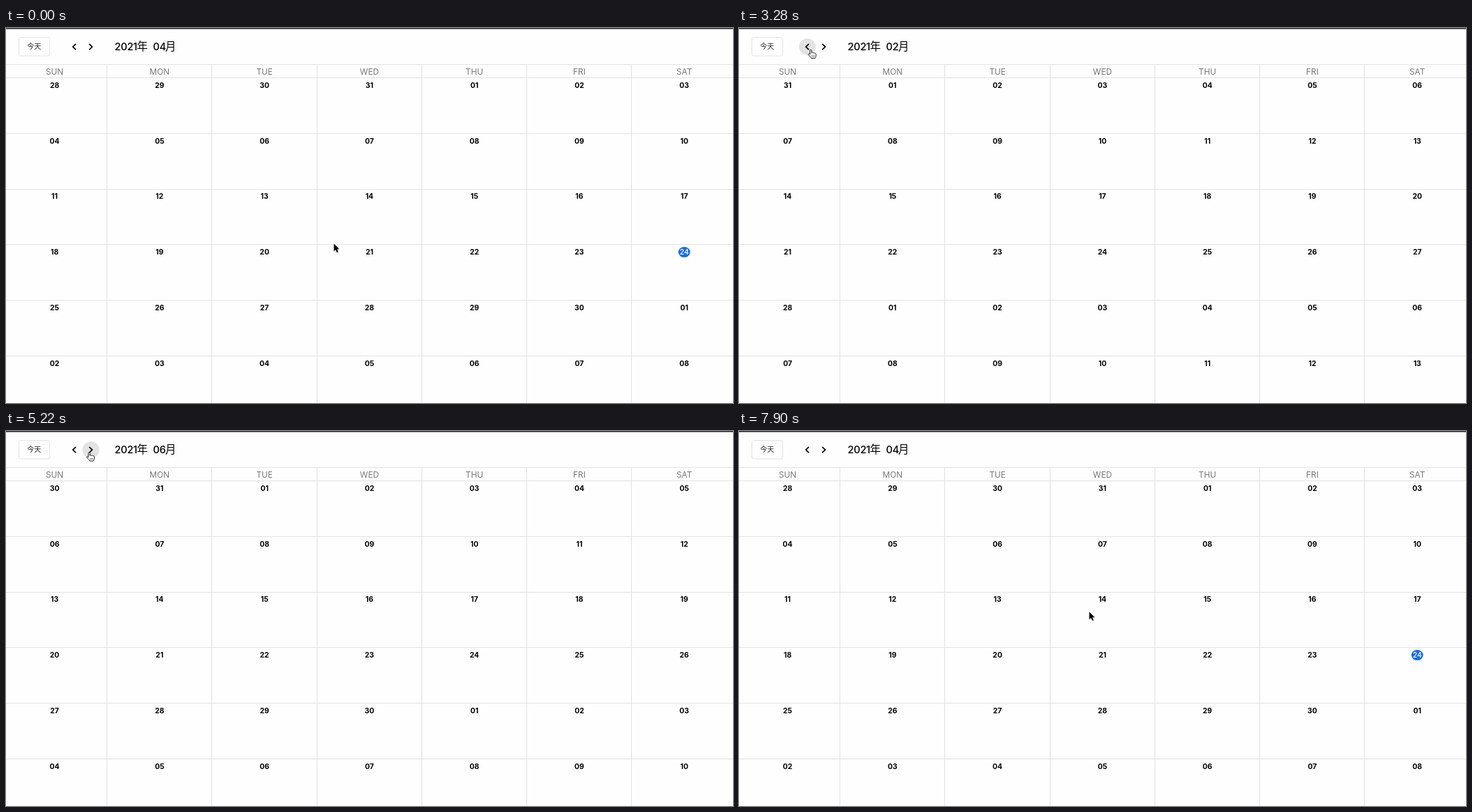
Write an HTML page that moves like this. It is 1041 px wide and 538 px high and loops after 8 s.

```html
<!DOCTYPE html>
<html lang="zh">
<head>
<meta charset="utf-8">
<title>Calendar</title>
<style>
  html, body { margin: 0; width: 100%; height: 100%; overflow: hidden; background: #fefefe; }
  svg { display: block; width: 100%; height: 100%; }
  text { font-family: Inter, Roboto, sans-serif; }
  .cjk { font-family: "Noto Sans CJK SC", "Noto Sans CJK", "Noto Sans CJK JP", sans-serif; }
  .head { font-size: 11.8px; fill: #777; text-anchor: middle; }
  .day { font-size: 10.4px; font-weight: 700; fill: #000; text-anchor: middle; }
  .day.today { font-weight: 500; fill: #fff; }
  .title { font-size: 14.6px; font-weight: 500; letter-spacing: -.3px; }
  .unit { font-size: 15.5px; font-weight: 500; }
  .chevron { fill: none; stroke: #000; stroke-width: 1.7; }
</style>
</head>
<body>
<svg id="stage" viewBox="0 0 1041 538">
  <rect width="1041" height="538" fill="#fefefe"/>
  <rect width="1041" height="1.5" fill="#262626"/>
  <g id="grid" fill="#e2e2e2"></g>

  <rect id="todayButton" x="18.5" y="13.5" width="44" height="26.5" rx="3" stroke="#e2e2e2"/>
  <text class="cjk" x="40.2" y="30.4" font-size="10" fill="#222" text-anchor="middle">今天</text>

  <circle id="hover" cy="27" r="12" fill="#e3e3e3"/>
  <path class="chevron" d="M100 22.8 L95.8 27 L100 31.2"/>
  <path class="chevron" d="M119.2 22.8 L123.4 27 L119.2 31.2"/>

  <text class="title" x="155.6" y="32.3">2021</text>
  <text class="unit cjk" x="187.4" y="32.4">年</text>
  <text class="title" id="month" x="210.6" y="32.3"></text>
  <text class="unit cjk" x="228" y="32.4">月</text>

  <ellipse id="mark" cx="971.2" cy="321.6" rx="8.5" ry="7.5" fill="#1a6fe0"/>
  <g id="days"></g>

  <g id="arrow">
    <path d="M.6 1.4 V12 L3 10 L4.8 14 L7 13 L5.3 9.2 H8.6 Z" fill="#000" opacity=".18"/>
    <path d="M0 0 V10.8 L2.5 8.6 L4.3 12.6 L6.3 11.7 L4.6 7.8 H7.8 Z"
          fill="#000" stroke="#fff" stroke-width=".9" paint-order="stroke"/>
  </g>
  <g id="hand">
    <path d="M3.2 7.6 V1.8 C3.2 .2 5.4 .2 5.4 1.8 V5.2 C6 4.4 7.4 4.6 7.6 5.4
             C8.4 4.8 9.6 5 9.8 5.9 C10.8 5.5 11.8 6 11.8 7.2 V9.2
             C11.8 11 10.6 11.4 10.4 13 H5 C4.6 11.4 2.6 10 1 8 C.2 6.9 1.4 6 2.2 6.7 Z"
          fill="#fff" stroke="#111" stroke-width=".95" stroke-linejoin="round"/>
    <path d="M6 8.6 V11 M7.7 8.6 V11 M9.4 8.6 V11" stroke="#111" stroke-width=".6"/>
  </g>
</svg>
<script>
const LOOP = 8000;
const COL = 150.27, ROW = 79.75;
const $ = id => document.getElementById(id);
const pad = n => String(n).padStart(2, "0");

// [time, month shown]
const months = [[0, 4], [1940, 3], [2680, 2], [4030, 3], [4320, 4], [4770, 5], [5220, 6], [5970, 4]];

// [time, hovered control]
const hovers = [[0, ""], [3280, "prev"], [3580, "next"], [5520, "prev"], [5670, "today"], [6710, ""]];

// [time, x, y, cursor]
const moves = [
  [0, 469.5, 309.5, "arrow"], [300, 440, 288, "arrow"], [450, 345, 218, "arrow"],
  [600, 235, 136, "arrow"], [750, 150, 72, "arrow"], [900, 107, 39, "arrow"], [1050, 95.5, 30, "arrow"],
  [1790, 97.5, 30.5, "hand"], [2080, 98.5, 30.5, "hand"],
  [3430, 105, 30.5, "hand"], [3580, 112, 30, "hand"], [3730, 114.8, 30, "hand"],
  [5370, 108, 30, "hand"], [5520, 86, 29, "hand"], [5670, 52, 27, "hand"], [5820, 40, 26, "hand"],
  [6710, 367, 140, "arrow"], [6860, 560, 236, "arrow"], [7010, 690, 310, "arrow"],
  [7160, 743, 340, "arrow"], [7460, 574, 301, "arrow"], [7760, 540, 281, "arrow"], [7900, 501.5, 259.5, "arrow"]
];

const latest = (list, t) => list.filter(item => item[0] <= t).pop();

function add(parent, tag, attrs, text = "") {
  const el = document.createElementNS("http://www.w3.org/2000/svg", tag);
  for (const key in attrs) el.setAttribute(key, attrs[key]);
  el.textContent = text;
  parent.append(el);
  return el;
}

const show = (el, on) => el.setAttribute("visibility", on ? "visible" : "hidden");

// Grid lines and weekday names
add($("grid"), "rect", { x: 0, y: 52, width: 1041, height: 1 });
for (let r = 0; r < 6; r++)
  add($("grid"), "rect", { x: 0, y: Math.floor(71.5 + r * ROW), width: 1041, height: 1 });
for (let c = 0; c < 6; c++)
  add($("grid"), "rect", { x: Math.floor(144.6 + c * COL), y: 52, width: 1, height: 486 });
["SUN", "MON", "TUE", "WED", "THU", "FRI", "SAT"].forEach((name, c) =>
  add($("stage"), "text", { class: "head", x: 69.6 + c * COL, y: 66.7 }, name));
$("stage").append($("arrow"), $("hand"));

const cells = Array.from({ length: 42 }, (_, i) =>
  add($("days"), "text", {
    class: "day", x: 69.6 + i % 7 * COL, y: 85.8 + Math.floor(i / 7) * ROW
  }));

let shown = 0;
function drawMonth(month) {
  if (month === shown) return;
  shown = month;
  const offset = new Date(2021, month - 1, 1).getDay();
  $("month").textContent = pad(month);
  cells.forEach((cell, i) => {
    const date = new Date(2021, month - 1, 1 - offset + i);
    const today = date.getMonth() === 3 && date.getDate() === 24;
    cell.textContent = pad(date.getDate());
    cell.classList.toggle("today", today);
  });
  show($("mark"), month === 4);
}

function draw(t) {
  drawMonth(latest(months, t)[1]);

  const over = latest(hovers, t)[1];
  show($("hover"), over === "prev" || over === "next");
  $("hover").setAttribute("cx", over === "next" ? 121.5 : 98);
  $("todayButton").setAttribute("fill", over === "today" ? "#f2f2f2" : "#fefefe");

  const [, x, y, kind] = latest(moves, t);
  for (const id of ["arrow", "hand"]) {
    show($(id), id === kind);
    $(id).setAttribute("transform", `translate(${x} ${y})`);
  }
}

const start = performance.now();
function tick() {
  draw((performance.now() - start) % LOOP);
  requestAnimationFrame(tick);
}
tick();
</script>
</body>
</html>
```
